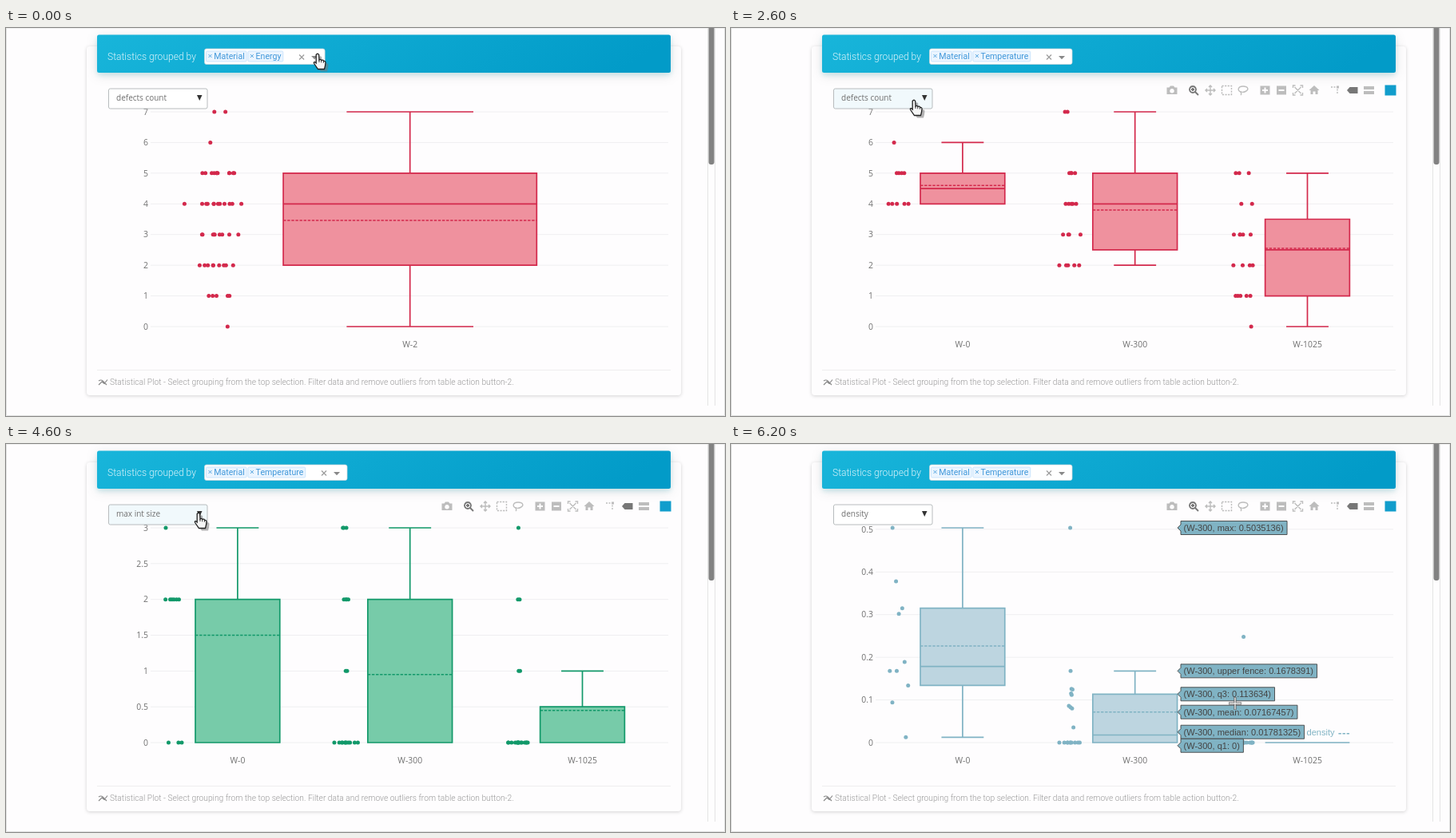
An HTML page for the animation above (6.4 s loop, 900x486 px).

```html
<!DOCTYPE html>
<html lang="en">
<head>
<meta charset="utf-8">
<title>Grouped statistics</title>
<style>
html, body { margin: 0; width: 100%; height: 100%; overflow: hidden; background: #fefdfe; }
svg { display: block; }
text { white-space: pre; }
.tick { font: 10.4px "Open Sans", sans-serif; fill: #707070; }
.opt { font: 10px "Open Sans", sans-serif; fill: #707070; }
.tag { font: 10.6px Roboto, sans-serif; fill: #4198da; }
.tip { font: 11.05px "Liberation Sans", Arial, sans-serif; fill: #444; }
.head { font: 300 12.05px Roboto, sans-serif; fill: #dff5fb; }
.foot { font: 300 10.25px Roboto, sans-serif; fill: #999; }
.icon { fill: #bdbdbd; }
.line { fill: none; stroke: #bdbdbd; stroke-width: 1.4; }
.card { filter: drop-shadow(0 1px 2px rgba(0,0,0,.17)); }
.bar { filter: drop-shadow(0 3px 3px rgba(0,172,193,.16)) drop-shadow(0 3px 7px rgba(0,0,0,.11)); }
</style>
</head>
<body>
<svg width="900" height="486" viewBox="0 0 900 486">
  <defs>
    <linearGradient id="blue" x1="0" y1="0" x2="1" y2="0.1">
      <stop offset="0" stop-color="#18b5da"/><stop offset="1" stop-color="#029bc8"/>
    </linearGradient>
  </defs>
  <rect width="900" height="486" fill="#fefdfe"/>
  <path d="M.5 0V485.500H899.500V0Z" fill="none" stroke="#e2e2e2"/>
  <rect x="101" y="23" width="744" height="437" rx="4" fill="#fefdfe" class="card"/>
  <rect x="114" y="8.500" width="718" height="47.500" rx="2.500" fill="url(#blue)" class="bar"/>
  <path d="M878.500 0V473M887.500 0V473" stroke="#e4e4e4"/>
  <rect x="879.500" y="-6" width="7" height="177" rx="3" fill="#828282"/>
  <text x="127" y="39.500" class="head">Statistics grouped by</text>
  <path d="M114 428.500H832" stroke="#eee"/>
  <path d="M116 447l4-4 3 2.500 4-5M116 442q3-2 5 0l5 5" fill="none" stroke="#888" stroke-width="1.200"/>
  <text x="130" y="447" class="foot">Statistical Plot - Select grouping from the top selection. Filter data and remove outliers from table action button-2.</text>
  <g id="scene"></g>
</svg>
<script>
const LOOP = 6400, STEP = 200;
const PLOT = { left: 182, right: 829.4, top: 105, bottom: 374 };
const scene = document.getElementById('scene');
const pen = document.createElement('canvas').getContext('2d');

const textWidth = (s, font) => { pen.font = font; return pen.measureText(s).width; };
const rect = (x, y, w, h, attrs) => `<rect x="${x}" y="${y}" width="${w}" height="${h}" ${attrs}/>`;
const path = (d, attrs) => `<path d="${d}" ${attrs}/>`;
const label = (x, y, s, cls, attrs = '') => `<text x="${x}" y="${y}" class="${cls}" ${attrs}>${s}</text>`;
const clamp = (i, n) => Math.max(0, Math.min(n - 1, i));
const between = (t, a, b) => t >= a && t < b;

// Each position in the list is a value, each entry how often it occurs.
const repeat = counts => counts.flatMap((n, value) => Array(n).fill(value));
const zeros = n => Array(n).fill(0);

const defects = [[0, 0, 0, 0, 5, 4, 1], [0, 0, 5, 4, 5, 4, 0, 2], [1, 5, 4, 5, 2, 3]].map(repeat);
const sizes = [[3, 0, 6, 1], [11, 2, 4, 3], [15, 2, 2, 1]].map(repeat);
const densities = [
  [0.0125, 0.094, 0.134, 0.168, 0.168, 0.189, 0.302, 0.315, 0.378, 0.5035],
  [...zeros(10), 0.0356265, 0.08, 0.083, 0.086, 0.112, 0.115268, 0.1242442, 0.126, 0.1678391, 0.5035136],
  [...zeros(18), 0.172, 0.248]
];

const RED = ['#d3294c', '#ef919e'], GREEN = ['#12996a', '#77cba9'], TEAL = ['#80b3c4', '#bdd5e0'];
const CHARTS = {
  single: { colors: RED, gap: 1, groups: [defects.flat().sort((a, b) => a - b)] },
  count: { colors: RED, gap: 1, groups: defects },
  size: { colors: GREEN, gap: 0.5, groups: sizes },
  density: { colors: TEAL, gap: 0.1, groups: densities }
};

const OPTIONS = ['defects count', 'max int size', 'max vac size', 'int in cluster', 'vac in cluster',
  'volume', 'density', 'planarity', 'subcascades', 'subcascade impact', 'hull nsimpl'];

function summarize(data) {
  const n = data.length;
  const quantile = p => {
    const k = n * p - 0.5, i = Math.floor(k);
    return data[i] + (data[clamp(i + 1, n)] - data[i]) * (k - i);
  };
  const q1 = quantile(0.25), median = quantile(0.5), q3 = quantile(0.75);
  const reach = 1.5 * (q3 - q1);
  return {
    q1, median, q3, min: data[0], max: data[n - 1],
    mean: data.reduce((a, b) => a + b) / n,
    low: data.find(v => v >= q1 - reach),
    high: data.findLast(v => v <= q3 + reach)
  };
}

function randomizer(seed) {
  const range = 2 ** 32;
  return function next() {
    const last = seed;
    seed = (69069 * seed + 1) % range;
    return Math.abs(seed - last) < range / 10 ? next() : seed / range;
  };
}

// Sideways scatter, wider where values crowd together.
function jitter(data, s, random) {
  const n = data.length;
  const spread = Math.max((s.max - s.min) / 10, s.q3 - s.q1);
  const crowd = data.map((_, i) => {
    const a = clamp(i - 5, n), b = clamp(i + 5, n);
    return Math.min(1, Math.sqrt(0.01 * spread * (b - a) / (data[b] - data[a] + spread * 1e-9)));
  });
  const most = Math.max(...crowd);
  return crowd.map(c => 0.6 * c / most * (random() - 0.5));
}

function drawChart({ colors: [stroke, fill], gap, groups }, names) {
  const max = Math.max(...groups.flat());
  const y = v => PLOT.bottom - v * (PLOT.bottom - PLOT.top) / max;
  const slot = (PLOT.right - PLOT.left) / groups.length;
  const half = slot * 0.245;
  const random = randomizer(2e9);
  let out = '', dots = '';

  for (let i = 0; i * gap <= max; i++) {
    const v = i * gap;
    out += path(`M181 ${y(v)}H829`, 'stroke="#efeff1"');
    out += label(178, y(v) + 3.7, +v.toFixed(1), 'tick', 'text-anchor="end"');
  }
  groups.forEach((data, i) => {
    const s = summarize(data), c = PLOT.left + slot * (i + 0.5);
    const across = (v, r) => `M${c - r} ${y(v)}H${c + r}`;
    out += rect(c - half, y(s.q3), 2 * half, y(s.q1) - y(s.q3), `fill="${fill}"`);
    out += path(`M${c - half} ${y(s.q3)}H${c + half}V${y(s.q1)}H${c - half}Z`
      + across(s.median, half) + across(s.low, half / 2) + across(s.high, half / 2)
      + `M${c} ${y(s.q3)}V${y(s.high)}M${c} ${y(s.q1)}V${y(s.low)}`,
      `fill="none" stroke="${stroke}" stroke-width="1.7"`);
    out += path(across(s.mean, half), `stroke="${stroke}" stroke-width="1.5" stroke-dasharray="3.4 1.7"`);
    out += label(c, 400, names[i], 'tick', 'text-anchor="middle"');
    jitter(data, s, random).forEach((shift, k) => {
      dots += `<circle cx="${c + half * (shift - 1.5)}" cy="${y(data[k])}" r="2.5"/>`;
    });
  });
  return out + `<g fill="${stroke}">${dots}</g>`;
}

function drawTips() {
  const s = summarize(densities[1]);
  const tips = [['max', s.max], ['upper fence', s.high], ['q3', s.q3], ['mean', s.mean], ['median', s.median], ['q1', s.q1]]
    .map(([name, v]) => ({
      text: `(W-300, ${name}: ${+v.toFixed(8)})`,
      y: PLOT.bottom - v * (PLOT.bottom - PLOT.top) / s.max
    }));
  tips.forEach((tip, i) => {
    const push = i ? (17 - (tip.y - tips[i - 1].y)) / 2 : 0;
    if (push > 0) { tip.y += push; tips[i - 1].y -= push; }
  });
  let out = rect(718, 354, 41, 15, 'fill="#fefdfe"')
    + label(720.5, 365, 'density', 'tip', 'style="fill:#80b3c4"');
  for (const { text, y } of tips) {
    const right = 571 + textWidth(text, '11.05px "Liberation Sans", Arial, sans-serif');
    out += path(`M559 ${y}l4-4v-4.500H${right}v17H563v-4.500z`, 'fill="#80b3c4" stroke="#444" stroke-width=".9"')
      + label(566.5, y + 4, text, 'tip');
  }
  return out;
}

function drawGroups(tags, open) {
  let x = 250.5, inner = '';
  for (const tag of tags) {
    const w = textWidth(tag, '10.6px Roboto, sans-serif') + 12;
    inner += rect(x, 29, w, 13, 'rx="1.5" fill="#ebf5ff" stroke="#c2e0fb" stroke-width=".8"')
      + path(`M${x + 3} 33l4 4m0-4l-4 4`, 'stroke="#4a9fdd" stroke-width=".9"')
      + label(x + 9.7, 39, tag, 'tag');
    x += w + 1.8;
  }
  const right = x + 50.5;
  let out = rect(248.5, 26, right - 248.5, 19.5, 'rx="2.5" fill="#fff" stroke="#ccd5d8" stroke-width=".7"') + inner;
  out += path(`M${right - 32} 33.500l6 6m0-6l-6 6`, 'stroke="#999" stroke-width="1.1"');
  out += path(`M${right - 17} 35h8l-4 4.200z`, 'fill="#888"');
  if (open) {
    out += rect(249, 46, right - 249, 25, 'fill="#fff" stroke="#ccc" stroke-width=".8"')
      + rect(249.5, 50, right - 250, 18, 'fill="#ebf5ff"')
      + label(257, 62.5, 'Temperature', 'opt');
  }
  return out;
}

function drawSelect(value, open, x, y) {
  const inside = top => between(x, 128, 252) && between(y + 1, top, top + 26);
  const field = (top, s, lit) =>
    rect(128.5, top, 123.5, 25, `rx="2" fill="${lit ? '#f1f9fc' : '#fff'}" stroke="#b8bcbe"`)
    + label(138, top + 14.7, s, 'opt');
  let out = field(76, value, inside(76) && !open) + path('M239 84h6.500l-3.250 7z', 'fill="#333"');
  if (open) OPTIONS.forEach((s, i) => {
    const top = 104.5 + 26.5 * i;
    out += field(top, s, s === value || inside(top));
  });
  return out;
}

function drawTools() {
  const at = (x, d, cls = 'icon', attrs = '') => path(d, `class="${cls}" transform="translate(${x} 78)" ${attrs}`);
  const square = 'M-6-5.500h12v11h-12z';
  return at(552, 'M-6.500-3.500h3l1.500-2h4l1.500 2h3v8.500h-13zM0-2a2.800 2.800 0 1 0 .01 0z', 'icon', 'fill-rule="evenodd"')
    + at(579, 'M-1-5a4 4 0 1 0 .01 0zM2 2l4 4M-3-1h4M-1-3v4', 'line', 'style="stroke:#777;stroke-width:1.8"')
    + at(600, 'M-6 0h12M0-6v12M-4-2l-2 2 2 2M4-2l2 2-2 2M-2-4l2-2 2 2M-2 4l2 2 2-2', 'line')
    + at(620.5, square, 'line', 'stroke-dasharray="2.200 1.400"')
    + at(641, 'M-3 2c-5-2-3-7 3-7s8 4 3 6.500-6-1-6 .5 2 2 0 4', 'line')
    + at(668.5, square + 'M-1-3.500v2.500h-2.500v2h2.500v2.500h2v-2.500h2.500v-2h-2.500v-2.500z', 'icon', 'fill-rule="evenodd"')
    + at(689, square + 'M-3.500-1v2h7v-2z', 'icon', 'fill-rule="evenodd"')
    + at(709.5, 'M-6-3v-3h3M3-6h3v3M6 3v3h-3M-3 6h-3v-3M-4-4l8 8M4-4l-8 8', 'line')
    + at(730, 'M0-6l6.500 6h-2v5h-3v-3.500h-3v3.500h-3v-5h-2z')
    + at(756, 'M-5-4h8v8', 'line', 'stroke-dasharray="2 1.500"')
    + at(756, 'M2-5.500h3v3h-3z')
    + at(778, 'M-7 0l3.500-4h10v8h-10z', 'icon', 'style="fill:#777"')
    + at(798.5, 'M-6.500-5h13v4h-13zM-6.500 1h13v4h-13z')
    + rect(818.5, 71.5, 14, 13, 'fill="#119dcc"');
}

const HAND = 'M-1.800 1.500Q0-1 1.700 1.500L2 8Q4 6.500 4.800 8.400 7 7.400 7.600 9.400 10 9 10 11.500L9.500 15.500 8.500 19.500H.5L-4 13Q-5.600 10.500-3.400 10.600L-1.800 12Z';
const CURSORS = {
  hand: path(HAND, 'transform="translate(3.500 3)" fill="#777" opacity=".55"')
    + path(HAND, 'fill="#f6f6f6" stroke="#222" stroke-width="1.300"')
    + path('M2 8v3M4.800 8.500v2.800M7.500 9.500v2.200', 'stroke="#222" stroke-width=".9"'),
  resize: path('M0-9l5 5h-3v8h3l-5 5-5-5h3v-8h-3z', 'fill="#eee" stroke="#888"'),
  cross: path('M0-8V8M-8 0H8', 'stroke="#555" stroke-width="3"')
    + path('M0-7.500V7.500M-7.500 0H7.500', 'stroke="#eee" stroke-width="1.400"')
};

// Stops of the pointer: [time, x, y]
const STOPS = [[0, 390, 32], [800, 300, 56], [1600, 310, 38], [2600, 229, 90], [3000, 190, 138],
  [3400, 171, 144], [4600, 241, 86], [5400, 200, 274], [6200, 631, 325]];

function pointerAt(t) {
  const i = STOPS.findLastIndex(s => s[0] <= t);
  const a = STOPS[i], b = STOPS[i + 1];
  if (!b) return [a[1], a[2]];
  const p = (t - a[0]) / (b[0] - a[0]);
  return [a[1] + (b[1] - a[1]) * p, a[2] + (b[2] - a[2]) * p];
}

function render(t) {
  const [x, y] = pointerAt(t);
  const open = between(t, 2800, 3200) || between(t, 4800, 5600);
  const shape = open || y < 101 ? 'hand' : x < 180 ? 'resize' : 'cross';

  const tags = ['Material'];
  if (t < 1800) tags.push('Energy');
  if (t >= 1000) tags.push('Temperature');

  const value = t < 3200 ? 'defects count' : t < 5600 ? 'max int size' : 'density';
  const kind = t < 1000 ? 'single' : t < 3200 ? 'count' : t < 5600 ? 'size' : 'density';
  const prefix = t < 1800 ? 'W-2' : 'W';
  const names = t < 1000 ? [prefix] : [0, 300, 1025].map(n => `${prefix}-${n}`);

  scene.innerHTML = drawChart(CHARTS[kind], names)
    + (t >= 2000 ? drawTools() : '')
    + (t >= 6200 ? drawTips() : '')
    + drawSelect(value, open, x, y)
    + drawGroups(tags, between(t, 400, 1000))
    + `<g transform="translate(${x} ${y})">${CURSORS[shape]}</g>`;
}

let shown = -1;
const start = performance.now();
function tick() {
  const step = Math.floor(((performance.now() - start) % LOOP) / STEP);
  if (step !== shown) render((shown = step) * STEP);
  requestAnimationFrame(tick);
}
tick();
</script>
</body>
</html>
```
